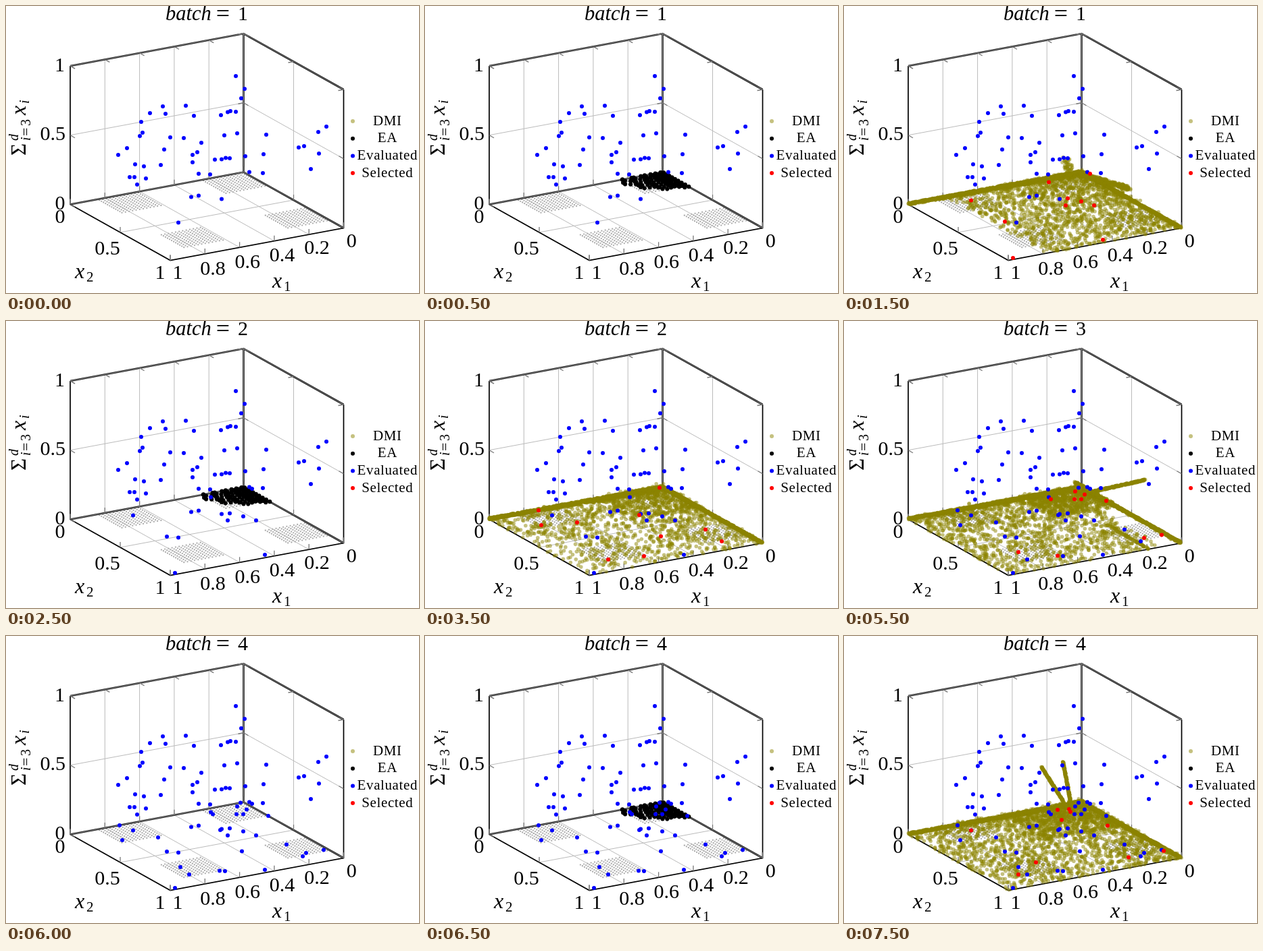
These frames come from a looping animation (611x426 px, 8 s). An HTML page with a canvas:

```html
<!DOCTYPE html>
<html lang="en">
<head>
<meta charset="utf-8">
<title>Batch scatter plot</title>
<style>
html, body { margin: 0; width: 100%; height: 100%; overflow: hidden; background: #fff; }
canvas { display: block; }
</style>
</head>
<body>
<canvas id="plot" width="611" height="426"></canvas>
<script>
const ctx = document.getElementById('plot').getContext('2d');
const FONT = '"Liberation Serif", "Times New Roman", serif';
const OLIVE = 'rgba(139,132,0,.5)', BLUE = '#00f', RED = '#f00', BLACK = '#000';
const STEP = 500, LOOP = 8000;

// Initially evaluated points, in stage pixels
const initial = [
  [340,104],[353,123],[348,137],[232,149],[266,148],[213,159],[236,160],[200,172],[278,163],
  [318,162],[328,157.5],[332,156],[340,157],[202,188],[198,193],[243,195],[263,196],[323,192],
  [342,189],[385,191],[474,179],[462,187],[433,210],[441,208],[463,219],[451,242],[179,211],
  [166,221],[234,213],[289,203],[283,217],[276,221],[276,232],[191,235],[204,238],[229,236],
  [309,228],[319,227.5],[325,225.5],[331,226],[354,223],[381,220],[183,254],[190,254],[207,256],
  [194,265],[285,249],[302,250],[360,246.5],[380,248],[274,283.5],[285,281.5],[319,286.5],[255,321.5]
];

// Points selected in each batch; they count as evaluated from the next batch on
const selected = [
  [[364,249],[303,261.5],[188,288.5],[331,285.5],[328,296],[351,290],[370,296],[238,320],[383,347],[250,374]],
  [[347,247.5],[168,281],[172,303],[225,299],[317,288],[349,319.5],[415,309.5],[439,327],[324,349],[271,354]],
  [[342,253],[356,257.5],[306,264.5],[341,264.5],[351,264.5],[388,267],[258,343],[316,348.5],[444,322],[470,317.5]],
  [[316,258],[333,257],[335,261],[322,273],[390,281.5],[188,288.5],[284,336],[258,354],[421,328.5],[473,319]]
];

// Sample clouds: edges [n1, n2], scatter [n, min x1, max x1, power x1, power x2],
// blob [n, size], streaks [x, y, x, y, n, width]
const clouds = [
  { edges: [1300, 600], scatter: [1500, 0, .78, 1.2, 1], blob: [250, .45],
    streaks: [[348,249,422,271,350,6], [328,226,335,248,40,11]] },
  { edges: [1200, 800], scatter: [1300, 0, 1, 1.2, 1.2], blob: [400, .4], streaks: [] },
  { edges: [1200, 900], scatter: [1500, .12, 1, 1, 1.4], blob: [800, .36],
    streaks: [[351,257,445,236,280,2], [342,240,376,258,120,3], [385,299,450,338,70,2]] },
  { edges: [900, 700], scatter: [2000, 0, 1, 1.25, 1.2], blob: [700, .45],
    streaks: [[292,194,331,256,190,1.5], [324,186,337,256,190,1.5]] }
];

const project = (a, b, z = 0) =>
  [351.5 - 256.5 * a + 148 * b, 246.5 + 48 * a + 83 * b - 205.5 * z];

function random(seed) {
  return () => {
    seed = seed + 0x6D2B79F5 | 0;
    let t = Math.imul(seed ^ seed >>> 15, 1 | seed);
    t = t + Math.imul(t ^ t >>> 7, 61 | t) ^ t;
    return ((t ^ t >>> 14) >>> 0) / 4294967296;
  };
}

function makeCloud({ edges, scatter, blob, streaks }, index) {
  const r = random(index + 11), pts = [];
  const repeat = (n, make) => { while (n--) pts.push(make()); };
  const near = () => -.012 * Math.log(1 - r() * .98);
  const [n, lo, hi, pa, pb] = scatter;
  repeat(n, () => project(lo + (hi - lo) * r() ** pa, r() ** pb, r() ** 6 * .04));
  repeat(blob[0], () => project(blob[1] * r() ** 1.5, blob[1] * r() ** 1.5, r() * .02));
  repeat(edges[0], () => {
    const a = r() ** 1.1;
    return project(a, near() * (1.7 - 1.5 * a), r() * .012);
  });
  repeat(edges[1], () => project(near() * .4, r() ** 1.1, r() * .008));
  for (const [x0, y0, x1, y1, count, w] of streaks) repeat(count, () => {
    const t = r();
    return [x0 + (x1 - x0) * t + (r() - .5) * w, y0 + (y1 - y0) * t + (r() - .5) * w];
  });
  return pts;
}
const cloudPoints = clouds.map(makeCloud);

// Quarter disc of points around the back corner
const front = [];
for (let ring = 0; ring < 9; ring++) {
  const n = 3 + ring * 2, radius = .012 + ring * .0295;
  for (let i = 0; i < n; i++) {
    const angle = Math.PI / 2 * i / (n - 1), wobble = 1 + .07 * Math.sin(i * 5 + ring * 3);
    front.push(project(radius * wobble * Math.cos(angle), radius * wobble * Math.sin(angle)));
  }
}

function dots(points, color, radius = 3) {
  ctx.fillStyle = color;
  for (const [x, y] of points) {
    ctx.beginPath();
    ctx.arc(x, y, radius, 0, 7);
    ctx.fill();
  }
}

function line(color, width, ...points) {
  ctx.strokeStyle = color;
  ctx.lineWidth = width;
  ctx.beginPath();
  points.forEach(p => ctx.lineTo(...p));
  ctx.stroke();
}

function text(str, x, y, size = 30, align = 'center', style = '') {
  ctx.font = `${style} ${size}px ${FONT}`;
  ctx.textAlign = align;
  ctx.fillStyle = BLACK;
  ctx.fillText(str, x, y);
}

function tick([x, y], dx, dy) {
  line('#777', 1.3, [x, y], [x + dx, y + dy]);
}

function drawBox() {
  const grid = (...points) => line('#bbb', 1, ...points);
  for (const a of [.2, .4, .6, .8]) grid(project(a, 0, 1), project(a, 0), project(a, 1));
  grid(project(0, .5, 1), project(0, .5), project(1, .5));
  grid(project(1, 0, .5), project(0, 0, .5), project(0, 1, .5));

  for (const a0 of [.015, .615]) for (const b0 of [.015, .635]) {
    const patch = [];
    for (let i = 0; i < 12; i++) for (let j = 0; j < 12; j++)
      patch.push(project(a0 + i * .0205, b0 + j * .0205));
    dots(patch, '#aaa', 1.15);
  }

  const back = [
    [project(1, 0, 1), project(0, 0, 1), project(0, 1, 1)],
    [project(1, 0), project(0, 0), project(0, 1)],
    [project(0, 0, 1), project(0, 0)]
  ];
  for (const edge of back) line(BLACK, 2.6, ...edge);
  for (const edge of back) line('#bbb', .8, ...edge);
  line(BLACK, 1.7, project(1, 0, 1), project(1, 0), project(1, 1), project(0, 1), project(0, 1, 1));

  for (const a of [0, .2, .4, .6, .8, 1]) {
    tick(project(a, 0, 1), 7, 4);
    tick(project(a, 0), 0, -8);
    tick(project(a, 1), 0, -8);
  }
  for (const b of [0, .5, 1]) {
    tick(project(0, b, 1), -8, 1.5);
    tick(project(0, b), 0, -8);
    tick(project(1, b), 0, -8);
    tick(project(1, 0, b), 7, 4);
    tick(project(0, 0, b), 7, 4);
    tick(project(0, 0, b), -8, 1.5);
    tick(project(0, 1, b), -7, -4);
  }
}

function drawLabels(batch) {
  text('batch', 236, 21, 30.5, 'left', 'italic');
  text('=', 321, 23, 36);
  text(batch, 350.5, 21);

  text('1', 79.5, 97);
  text('0.5', 88, 199, 30, 'right');
  text('0', 80, 302);
  text('0', 80, 322);
  text('0.5', 150, 369);
  text('1', 228, 405);
  text('1', 254, 405);
  ['0.8', '0.6', '0.4', '0.2', '0'].forEach((s, i) => text(s, 306 + i * 51.3, 399 - i * 10.2));

  text('x', 102, 404, 32, 'left', 'italic');
  text('2', 119, 409, 21, 'left');
  text('x', 394, 418, 32, 'left', 'italic');
  text('1', 411, 423, 21, 'left');

  ctx.save();
  ctx.translate(29, 222);
  ctx.rotate(-Math.PI / 2);
  text('Σ', 0, 0, 31, 'left');
  text('d', 22, -11, 20, 'left', 'italic');
  text('i', 22, 7, 20, 'left', 'italic');
  text('=', 29, 7, 22, 'left');
  text('3', 44, 7, 20, 'left');
  text('x', 60, 0, 32, 'left', 'italic');
  text('i', 77, 5, 20, 'left', 'italic');
  ctx.restore();

  const legend = [['DMI', OLIVE], ['EA', BLACK], ['Evaluated', BLUE], ['Selected', RED]];
  ctx.letterSpacing = '0.6px';
  legend.forEach(([name, color], i) => {
    const y = 171 + i * 25.7;
    dots([[513, y]], color);
    text(name, 564.3, y + 5.5, 21);
  });
  ctx.letterSpacing = '0px';
}

function draw(step) {
  const batch = step >> 2, phase = step % 4;
  ctx.fillStyle = '#fff';
  ctx.fillRect(0, 0, 611, 426);
  drawBox();
  if (phase === 1) dots(front, BLACK, 3.1);
  if (phase > 1) dots(cloudPoints[batch], OLIVE, 2.8);
  dots(initial, BLUE);
  selected.slice(0, batch).forEach(points => dots(points, BLUE));
  if (phase === 3) dots(selected[batch], RED);
  drawLabels(batch + 1);
}

let shown = -1;
const start = performance.now();
function frame() {
  const step = Math.floor((performance.now() - start) % LOOP / STEP);
  if (step !== shown) draw(shown = step);
  requestAnimationFrame(frame);
}
frame();
</script>
</body>
</html>
```
